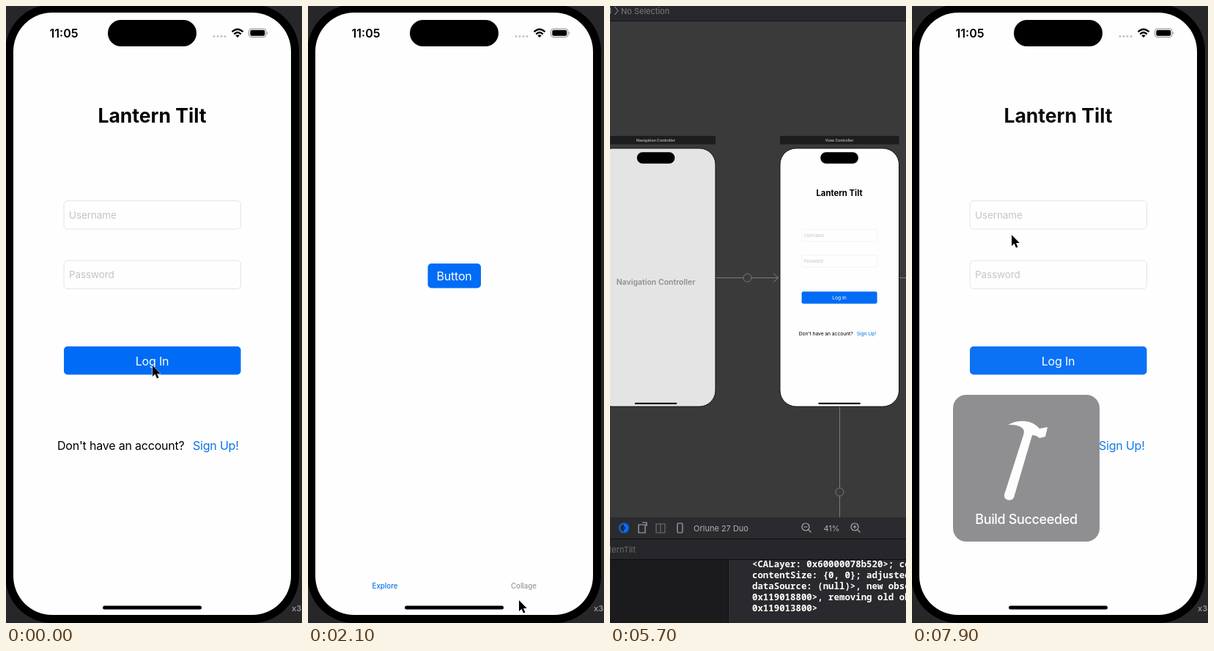
Recreate the animation shown at these times as an HTML page. Size 404 by 841 pixels, loop 8000 ms.

```html
<!DOCTYPE html>
<html lang="en">
<head>
<meta charset="utf-8">
<title>Login demo</title>
<style>
  html, body { margin: 0; width: 100%; height: 100%; overflow: hidden; background: #3a3a3a; }
  svg { display: block; width: 404px; height: 841px; font-family: Inter, sans-serif; }
  .mid { text-anchor: middle; }
  .end { text-anchor: end; }
  .body { font-size: 16px; letter-spacing: -.2px; }
  .ui { font-size: 11px; }
  .paper { fill: #fefefe; }
  .blue { fill: #006cf5; }
  .link { fill: #0874e8; }
  .field { fill: none; stroke: #e4e4e6; }
  .hint { fill: #c3c3c6; font-size: 13.5px; letter-spacing: -.1px; }
  .tab { font-size: 9.7px; font-weight: 500; }
  .wire { fill: none; stroke: #7c7c7e; }
  .icon { fill: none; stroke: #acacae; stroke-width: 1.2; }
  .tag { fill: #a6a6a8; font-size: 5.1px; font-weight: 700; }
  .console { font: bold 12.4px "Noto Sans Mono", monospace; fill: #fff; white-space: pre; }
</style>
</head>
<body>
<svg viewBox="0 0 404 841">
  <defs>
    <clipPath id="screen"><rect x="10" y="9" width="379" height="821" rx="53"/></clipPath>
    <linearGradient id="shade" x2=".25" y2="1">
      <stop stop-color="#45454a"/><stop offset=".45" stop-color="#35363a"/><stop offset="1" stop-color="#242428"/>
    </linearGradient>
    <g id="form">
      <text class="mid" x="199.5" y="159" font-size="26.5" font-weight="700">Lantern Tilt</text>
      <rect class="field" x="79" y="265.5" width="241.5" height="38.5" rx="5"/>
      <text class="hint" x="86" y="290">Username</text>
      <rect class="field" x="79" y="347" width="241.5" height="38.5" rx="5"/>
      <text class="hint" x="86" y="371">Password</text>
      <rect class="blue" x="79" y="464" width="241.5" height="38.5" rx="5"/>
      <text class="body mid" x="199.5" y="489.5" fill="#fff">Log In</text>
      <text class="body" x="70" y="604.5">Don't have an account?</text>
      <text class="body link" x="255" y="604.5">Sign Up!</text>
    </g>
    <g id="hardware">
      <rect x="139" y="19" width="121" height="36" rx="18"/>
      <rect x="132" y="817.5" width="135" height="5" rx="2.5"/>
    </g>
    <g id="lens"><circle r="5"/><path d="M3.6 3.6L7.5 7.5M-2.5 0H2.5"/></g>
  </defs>

  <g id="editor">
    <rect width="404" height="841" fill="#3a3a3a"/>
    <rect width="404" height="20" fill="#28282c"/>
    <path d="M0 20.5H404" stroke="#161618"/>
    <g id="crumb">
      <path d="M0 2Q2 6.5 0 11M6.5 1L11 6.5 6.5 12" fill="none" stroke="#a0a0a2"/>
      <text class="ui" x="15" y="10.5">No Selection</text>
    </g>
    <path class="wire" d="M144 370.5H230M223 364.5L230 370.5 223 376.5M394 370.5H404M313.5 546V697"/>
    <g fill="#3a3a3a" stroke="#7c7c7e">
      <circle cx="187.5" cy="370.5" r="5.5"/><circle cx="313.5" cy="662.5" r="5.5"/>
    </g>
    <rect x="-19" y="177" width="163" height="11.5" fill="#1d1d20"/>
    <rect x="232" y="177" width="162.5" height="11.5" fill="#1d1d20"/>
    <text class="tag mid" x="62.5" y="185">Navigation Controller</text>
    <text class="tag mid" x="313" y="185">View Controller</text>
    <rect x="-18.5" y="194" width="162.5" height="352" rx="22" fill="#e4e4e5" stroke="#111"/>
    <rect class="paper" x="232" y="194" width="162.5" height="352" rx="22" stroke="#111"/>
    <text class="mid" x="62.5" y="379.5" font-size="10.5" font-weight="600" fill="#8e8e91">Navigation Controller</text>
    <use href="#hardware" transform="translate(-22.7 191.2) scale(.4275)"/>
    <use href="#hardware" transform="translate(227.8 191.2) scale(.4275)"/>
    <use href="#form" transform="translate(227.9 191.4) scale(.4265)"/>

    <rect y="697" width="404" height="30" fill="#2b2b2f"/>
    <circle class="blue" cx="19" cy="711.5" r="7"/>
    <path d="M19 706.5a5 5 0 0 0 0 10z" fill="#2b2b2f"/>
    <circle cx="19" cy="711.5" r="2" fill="#2b2b2f"/>
    <g class="icon">
      <path d="M39 707H48V718H39ZM44 704H50V709"/>
      <path d="M63 706H75V718H63ZM69 706V718" stroke="#6e6e70"/>
      <rect x="92" y="705" width="7" height="13" rx="1.5"/>
      <use href="#lens" x="267" y="710"/>
      <use href="#lens" x="334" y="710"/><path d="M334 707.5V712.5"/>
    </g>
    <g class="ui" fill="#b0b0b2">
      <text x="114" y="715.5">Orlune 27 Duo</text>
      <text class="mid" x="302.5" y="715.5">41%</text>
    </g>
    <rect y="727" width="404" height="27" fill="#27272b"/>
    <path d="M0 726.5H404M0 754.5H404" stroke="#0e0e10"/>
    <text id="target" class="ui end" y="744.5"></text>
    <rect y="755" width="161" height="86" fill="#1b1b1e"/>
    <rect x="162.5" y="755" width="242" height="86" fill="#29292e"/>
    <path d="M161.5 755V841" stroke="#0e0e10"/>
    <g id="log" class="console">
      <text x="194" y="765">&lt;CALayer: 0x60000078b520&gt;; co</text>
      <text x="194" y="780">contentSize: {0, 0}; adjusted</text>
      <text x="194" y="795">dataSource: (null)&gt;, new obse</text>
      <text x="194" y="810">0x119018800&gt;, removing old ob</text>
      <text x="194" y="825">0x119013800&gt;</text>
    </g>
  </g>

  <g id="phone">
    <rect width="404" height="841" fill="#27272a"/>
    <rect x="-1" y="-2" width="401" height="843" rx="64"/>
    <text id="stray" x="390" y="825" font-size="11" font-weight="600" fill="#969698">x3</text>
    <g clip-path="url(#screen)">
      <rect class="paper" width="404" height="841"/>
      <g id="login">
        <use href="#form"/>
        <rect id="dim" x="10" width="500" height="841" fill="#ebebee" style="mix-blend-mode:multiply"/>
      </g>
      <g id="explore">
        <rect class="paper" x="10" width="379" height="841"/>
        <rect class="blue" x="163.5" y="351" width="72.5" height="33.5" rx="5"/>
        <text class="body mid" x="199.5" y="373.8" fill="#fff">Button</text>
        <text class="tab mid link" x="105" y="793.5">Explore</text>
        <text class="tab mid" x="294.5" y="793.5" fill="#979799">Collage</text>
      </g>
    </g>
    <use href="#hardware"/>
    <text class="mid" x="79" y="42.8" font-size="16" font-weight="600">11:05</text>
    <path d="M284 41.3H301" stroke="#c4c4c6" stroke-width="3.2" stroke-linecap="round" stroke-dasharray="0 5"/>
    <path d="M308.5 35.2Q316 28.3 323.5 35.2M311.3 38.3Q316 33.8 320.7 38.3" fill="none" stroke="#000" stroke-width="2.3"/>
    <path d="M313.3 40.3Q316 38 318.7 40.3L316 43Z"/>
    <rect x="331.5" y="31" width="23.5" height="11.5" rx="3.5" fill="none" stroke="#8c8c8e"/>
    <rect x="333.3" y="32.8" width="20" height="8" rx="2"/>
    <path d="M356.3 35Q358.5 36.8 356.3 38.7Z" fill="#8c8c8e"/>
  </g>

  <g id="toast">
    <rect id="panel" x="56" y="530" width="200" height="200" rx="18"/>
    <path id="hammer" d="M131 571Q141 565 155 566 166 567 174 576L185 574 182 587 174 589Q170 585 164 585L139 670Q136 675 130 673 125 671 126 666L152 585Q155 576 147 573 139 570 131 571Z"/>
    <text class="mid" x="156" y="706" font-size="18" font-weight="500" letter-spacing="-.35" fill="#fff">Build Succeeded</text>
  </g>

  <path id="cursor" d="M0 0V15L3.5 11.8 6 17.5 8.5 16.4 6 11H10.8Z" stroke="#fff" paint-order="stroke"/>
</svg>
<script>
const LOOP = 8000, STEP = 100;
const PUSH = 800, PUSH_TIME = 500, WIDTH = 379;
const EDITOR = 5700, RERUN = 6600, TOAST = 7300, RELAUNCH = 7700;

// time, x, y of the pointer tip
const pointer = [
  [0, 200, 490], [800, 199, 489], [900, 196, 488], [1300, 196, 490],
  [2100, 288, 810], [2500, 290, 790], [3200, 108, 788], [3800, 130, 240],
  [4500, 124, 225], [5100, -20, -25], [6600, -20, 60], [7200, 79, 238],
  [7500, 79, 238], [7900, 136, 312], [8000, 136, 312]
];

const $ = id => document.getElementById(id);
const clamp = v => Math.max(0, Math.min(1, v));
const show = (id, on) => { $(id).style.display = on ? '' : 'none'; };
const move = (id, x, y = 0) => $(id).setAttribute('transform', `translate(${x} ${y})`);

function pointerAt(t) {
  const i = pointer.findIndex(key => key[0] > t);
  const [t0, x0, y0] = pointer[i - 1], [t1, x1, y1] = pointer[i];
  const u = (t - t0) / (t1 - t0), k = u * u * (3 - 2 * u);
  return [x0 + (x1 - x0) * k, y0 + (y1 - y0) * k];
}

function draw(t) {
  const relaunched = t >= RELAUNCH;
  const rerun = t >= RERUN;
  const active = t > EDITOR;

  const push = relaunched ? 0 : 1 - (1 - clamp((t - PUSH) / PUSH_TIME)) ** 2;
  move('login', -0.3 * WIDTH * push);
  move('explore', WIDTH * (1 - push));
  $('login').style.opacity = relaunched ? clamp((t - RELAUNCH) / 210) : 1;
  $('dim').style.opacity = clamp(push / 0.36);

  show('phone', t < EDITOR || relaunched);
  show('stray', t < 3000 || relaunched);
  show('log', !rerun);
  $('crumb').setAttribute('fill', active ? '#ececee' : '#7c7c7e');
  $('target').textContent = rerun ? 'Waiting to attach' : 'LanternTilt';
  $('target').setAttribute('x', rerun ? 46 : 35);
  $('target').setAttribute('fill', active ? '#ececee' : '#6e6e70');

  show('toast', t >= TOAST);
  $('panel').setAttribute('fill', relaunched ? '#8f8f91' : 'url(#shade)');
  $('hammer').setAttribute('fill', relaunched ? '#fdfdfd' : '#acacae');
  move('cursor', ...pointerAt(t));
}

function tick() {
  draw(Math.floor(performance.now() % LOOP / STEP) * STEP);
  requestAnimationFrame(tick);
}
tick();
</script>
</body>
</html>
```
